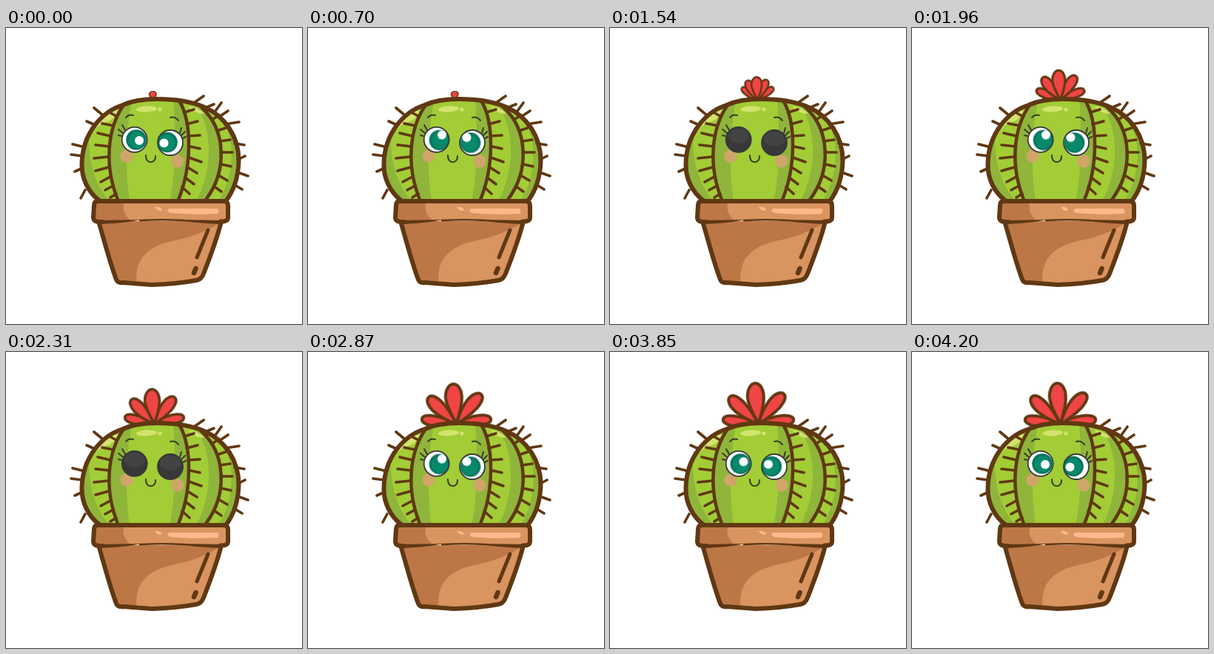
These frames come from a looping animation (400 px wide and 400 px high, 4270 ms). An HTML page:

```html
<!DOCTYPE html>
<html lang="en">
<head>
<meta charset="utf-8">
<title>Blooming cactus</title>
<style>
html, body { margin: 0; width: 100%; height: 100%; overflow: hidden; background: #fff; }
svg { display: block; width: 100vw; height: 100vh; }
.ink { fill: none; stroke: #603813; stroke-linecap: round; stroke-linejoin: round; }
.spikes { stroke-width: 3.6; }
.ribs { stroke-width: 4.5; }
.edge { stroke-width: 6; }
.face { fill: none; stroke: #3a3d24; stroke-width: 2; stroke-linecap: round; }
.light { fill: #a2cd36; }
.shade { fill: #8fb53b; }
.glow { fill: #d3e36e; }

.petal, .lid, .iris, .spark { animation: 4270ms linear infinite; }
.petal { fill: #f04545; stroke: #603813; stroke-width: 4; stroke-linejoin: round; animation-name: bloom; }
.lid { animation-name: blink; }
.iris { animation-name: look; }
.spark { animation-name: shine; }

@keyframes bloom {
  0%, 16.39% { transform: translateX(-2px) rotate(0deg) scale(.42, .21); }
  27.87% { transform: translateX(-1.5px) rotate(calc(var(--a) * .4)) scale(.54, .42); }
  36.07% { transform: translateX(-1px) rotate(calc(var(--a) * .63)) scale(.64, .56); }
  40.98% { transform: rotate(calc(var(--a) * .75)) scale(.72, .65); }
  54.1% { transform: rotate(calc(var(--a) * .93)) scale(.9, .85); }
  67.21% { transform: rotate(calc(var(--a) * .99)) scale(1, .98); }
  80.33%, 100% { transform: rotate(var(--a)); }
}
@keyframes blink {
  0%, 3.98%, 9.84%, 18.74%, 24.59%, 33.49%, 39.34%, 51.52%, 57.38%,
  69.56%, 75.41%, 84.31%, 90.16%, 100% { transform: translateY(-38px); }
  6.09%, 7.73%, 20.84%, 22.48%, 35.6%, 37.24%, 53.63%, 55.27%,
  71.66%, 73.3%, 86.42%, 88.06% { transform: none; }
}
@keyframes look {
  0%, 92%, 100% { transform: none; }
  13.11%, 81.97% { transform: translate(1.5px, .5px); }
}
@keyframes shine {
  0%, 98.36%, 100% { transform: none; }
  13.11%, 81.97% { transform: translate(1px, -7.5px); }
}
</style>
</head>
<body>
<svg viewBox="0 0 400 400">
  <defs>
    <path id="petal" d="M0 0C-4 -10 -11.5 -25 -11.5 -37C-11 -47 -6 -55 0 -55C7 -55 11 -46 10.5 -36C10 -24 4 -10 0 0Z"/>
    <path id="sidePetal" d="M0 0C-4 -8 -9 -24 -9 -36C-9 -46 -5 -53 0 -53C6 -53 8 -44 8 -35C7 -22 4 -10 0 0Z"/>
    <path id="lowPetal" d="M0 0C-4 -7 -7.5 -20 -7 -32C-7 -42 -4 -48 0 -48C5 -48 6.5 -41 6.5 -32C6 -20 4 -8 0 0Z"/>
    <path id="body" d="M127 234C111 222 102 203 102.5 184C103 143 129 113 158 104C171 98 187 96 204 96C226 96 250 99 268 107C296 119 314.5 147 314.5 179C314 203 306 222 297 234Z"/>
    <path id="pot" d="M125 261C133 288 140 316 149 340Q151 345 158 344Q183 346 197 347Q230 346 257 341Q264 340 267 332C276 309 285 286 291 261"/>
    <path id="rim" d="M181 260Q152 262 124 262Q118 262 118 256L119 240Q119 234 124 234H294Q300 234 300 240V256Q300 262 293 262Q267 259 241 260"/>
    <clipPath id="inBody"><use href="#body"/></clipPath>
    <clipPath id="inPot"><use href="#pot"/></clipPath>
    <clipPath id="inRim"><use href="#rim"/></clipPath>
    <clipPath id="inLeft"><circle cx="173.7" cy="150.8" r="17.4"/></clipPath>
    <clipPath id="inRight"><circle cx="222" cy="155" r="17.4"/></clipPath>
  </defs>

  <g transform="translate(200.5 97)">
    <use href="#lowPetal" class="petal" style="--a:-83deg"/>
    <use href="#lowPetal" class="petal" style="--a:83deg"/>
    <use href="#sidePetal" class="petal" style="--a:-47deg"/>
    <use href="#sidePetal" class="petal" style="--a:40deg"/>
    <use href="#petal" class="petal" style="--a:-5deg"/>
  </g>

  <g clip-path="url(#inBody)">
    <use href="#body" class="light"/>
    <path class="shade" d="M95 145L112 142Q110 200 140 234H95ZM160 100C128 144 136 195 152 234H167C161 195 161 140 171 95Z"/>
    <path class="shade" d="M226 94C229 140 230 195 221 234H235C249 194 252 138 237 96Z"/>
    <path class="shade" d="M252 98C280 130 281 190 257 234H272C298 190 297 140 263 104ZM284 110C313 146 309 200 287 234H320V110Z"/>
    <path class="glow" d="M116 142Q128 116 151 111Q147 124 135 127Q124 130 116 142Z"/>
    <path class="glow" d="M246 106Q261 107 268 116Q256 116 246 106Z"/>
    <ellipse class="glow" cx="190" cy="109.5" rx="14" ry="4" transform="rotate(-3 190 109)"/>
    <circle class="glow" cx="208" cy="110" r="2.6"/>
  </g>

  <path class="ink ribs" d="M159 104C136 137 133 187 151 232M234 98C252 128 251 188 233 232M264 107C297 137 300 192 270 232"/>
  <path class="ink spikes" d="M149 119L138 113M145 132L130 129M141 146L124 142M139 160L121 158M138 174L119 176M139 188L121 193M141 201L128 208M145 213L134 219M149 224L141 229
    M241 114L254 110M244 130L259 126M247 146L262 145M248 160L262 163M247 175L264 181M245 188L258 196M242 202L254 211M238 215L248 224
    M278 124L288 118M285 139L297 135M289 153L303 151M290 168L306 168M290 184L304 187M287 199L299 206M281 214L291 221"/>
  <path class="ink spikes" d="M131 118L119 108M120 131L109 126M106 161L90 157M103 173L88 171M104 189L93 194M107 219L101 230
    M254 101L267 92M269 108L281 103M281 115L291 101M288 120L300 112M296 130L315 127M309 156L322 158M313 178L323 173M313 195L327 200M309 212L319 218"/>
  <use href="#body" class="ink edge"/>

  <g clip-path="url(#inPot)">
    <use href="#pot" fill="#bd7747"/>
    <path fill="#d99460" d="M177 350C172 313 190 296 224 288Q260 282 292 262V350Z"/>
  </g>
  <path class="ink" stroke-width="5" d="M273 273L258 310"/>
  <path class="ink" stroke-width="6.5" d="M256.5 325L254 331"/>
  <use href="#pot" class="ink edge"/>
  <g clip-path="url(#inRim)">
    <use href="#rim" fill="#d99460"/>
    <path fill="#bd7747" d="M115 230H161Q154 248 167 259L180 264H115Z"/>
    <path fill="#fdb98b" d="M221 244H286Q289 247 286 251Q252 253 222 250Q215 247 221 244ZM201 242Q208 241 211 246Q206 249 201 242Z"/>
  </g>
  <path class="ink" stroke-width="2.5" d="M181 260Q211 258.500 241 260"/>
  <path fill="#603813" d="M122 260L182 259Q160 264 124 265ZM240 259L296 260L292 265Q264 264 240 261Z"/>
  <path class="ink edge" d="M130 262Q118 263 118 256L119 240Q119 234 124 234H294Q300 234 300 240V256Q300 262 290 261.500"/>

  <g fill="#d0a56a">
    <circle cx="163" cy="173" r="8.7"/>
    <circle cx="232" cy="180" r="8.7"/>
  </g>
  <path class="face" d="M162 121Q166 116 172 118M222 121Q228 119 233 125M189 172C188 184 203 184 202 173
    M161 138L157 131M158 142L152 137M156 146L152 145M235 142L237 135M237 145L242 140M239 149L243 147"/>

  <g clip-path="url(#inLeft)">
    <circle cx="173.7" cy="150.8" r="18" fill="#fff"/>
    <g class="iris">
      <circle cx="176" cy="151" r="13.8" fill="#06765f"/>
      <circle cx="176.500" cy="151.500" r="11" fill="#078a6c"/>
    </g>
    <circle class="spark" cx="180" cy="152" r="6" fill="#fff"/>
    <g class="lid">
      <circle cx="173.7" cy="150.8" r="18" fill="#383838"/>
      <ellipse cx="174" cy="146" rx="14" ry="10" fill="#434343"/>
    </g>
  </g>
  <g clip-path="url(#inRight)">
    <circle cx="222" cy="155" r="18" fill="#fff"/>
    <g class="iris">
      <circle cx="218" cy="154.5" r="13.8" fill="#06765f"/>
      <circle cx="217.500" cy="155" r="11" fill="#078a6c"/>
    </g>
    <circle class="spark" cx="213.5" cy="155.5" r="6" fill="#fff"/>
    <g class="lid">
      <circle cx="222" cy="155" r="18" fill="#383838"/>
      <ellipse cx="222" cy="150" rx="14" ry="10" fill="#434343"/>
    </g>
  </g>
  <g fill="none" stroke="#383838" stroke-width="1.8">
    <circle cx="173.7" cy="150.8" r="17"/>
    <circle cx="222" cy="155" r="17"/>
  </g>
</svg>
</body>
</html>
```
